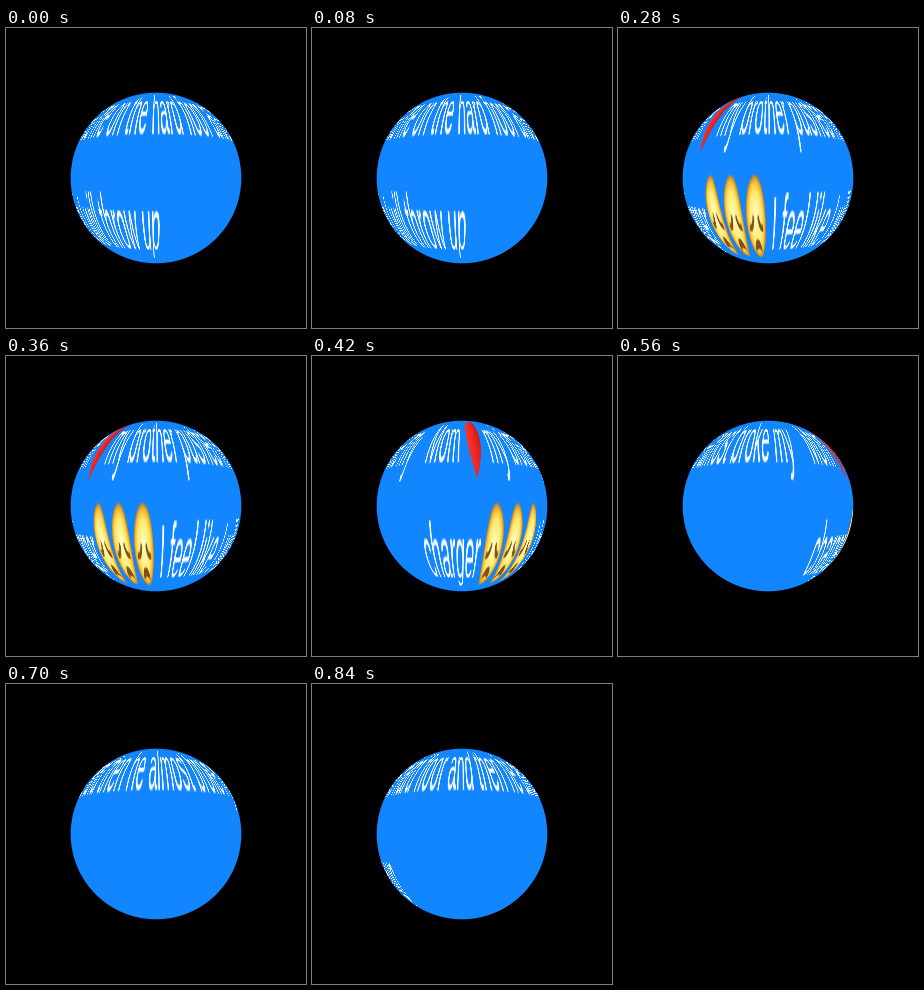
Recreate the animation shown at these times as an HTML page with a canvas. Size 300 px wide and 300 px high, loop 980 ms.

```html
<!DOCTYPE html>
<html lang="en">
<head>
<meta charset="utf-8">
<title>Spinning message ball</title>
<style>
  html, body { margin: 0; width: 100%; height: 100%; overflow: hidden; background: #000; }
  canvas { display: block; width: 300px; height: 300px; }
</style>
</head>
<body>
<canvas id="stage" width="300" height="300"></canvas>
<script>
const SIZE = 300, MID = 150, RADIUS = 85.3;
const CAMERA = 3.7;            // eye distance in ball radii
const STEPS = 7, STEP_MS = 140;
const EM = 40;                 // text size on the flat strip
const STRIP_W = 1436, STRIP_H = 144;
const START = 0.51;            // part of the strip facing the viewer at first
const BLUE = '#1186ff';

const stage = document.getElementById('stage').getContext('2d');

function makeStrip() {
  const canvas = document.createElement('canvas');
  canvas.width = STRIP_W;
  canvas.height = STRIP_H;
  const ctx = canvas.getContext('2d');
  ctx.fillStyle = BLUE;
  ctx.fillRect(0, 0, STRIP_W, STRIP_H);
  ctx.font = `${EM}px "Liberation Sans", Arial, sans-serif`;

  // Lays out strings, gaps and drawn symbols from left to right.
  function line(baseline, parts) {
    let pen = 24;
    for (const part of parts) {
      if (typeof part === 'string') {
        ctx.fillStyle = '#fff';
        ctx.fillText(part, pen, baseline);
        pen += ctx.measureText(part).width;
      } else if (typeof part === 'number') {
        pen += part;
      } else {
        ctx.save();
        ctx.translate(pen + 26, baseline - 15);
        part(ctx);
        ctx.restore();
        pen += 52;
      }
    }
  }

  line(52.5, ['Mom ', heart,
    ' my brother pushed me on the hard floor and then he almost broke my']);
  line(108.2, ['charger', 5, face, face, face, ' I feel like I will throw up']);
  return ctx.getImageData(0, 0, STRIP_W, STRIP_H).data;
}

function heart(ctx) {
  const red = ctx.createLinearGradient(-20, 0, 20, 0);
  red.addColorStop(0, '#f8382e');
  red.addColorStop(0.6, '#e9241f');
  red.addColorStop(1, '#c91a18');
  ctx.fillStyle = red;
  ctx.beginPath();
  ctx.moveTo(0, 23);
  ctx.bezierCurveTo(-11, 15, -21, 6, -21, -6);
  ctx.bezierCurveTo(-21, -21, -5, -22, 0, -11);
  ctx.bezierCurveTo(5, -22, 21, -21, 21, -6);
  ctx.bezierCurveTo(21, 6, 11, 15, 0, 23);
  ctx.fill();
}

function face(ctx) {
  const skin = ctx.createRadialGradient(0, -5, 3, 0, 0, 22.5);
  skin.addColorStop(0, '#fffab4');
  skin.addColorStop(0.55, '#ffe96a');
  skin.addColorStop(0.82, '#f3b935');
  skin.addColorStop(1, '#b97a18');
  ctx.fillStyle = skin;
  ctx.beginPath();
  ctx.arc(0, 0, 22.5, 0, 7);
  ctx.fill();

  ctx.strokeStyle = ctx.fillStyle = '#80501a';
  ctx.lineWidth = 3.5;
  for (const side of [-1, 1]) {
    ctx.beginPath();
    ctx.moveTo(side * 5, -5);
    ctx.quadraticCurveTo(side * 8, 2, side * 16, 1);
    ctx.stroke();
  }
  ctx.beginPath();
  ctx.moveTo(-10, 17);
  ctx.bezierCurveTo(-9, 4, 9, 4, 10, 17);
  ctx.quadraticCurveTo(0, 11, -10, 17);
  ctx.fill();
}

// Casts a ray through every ball pixel; keeps strip coordinates and edge coverage.
function makeBall() {
  const ball = [];
  const far = CAMERA * CAMERA - 1;
  const focus = RADIUS * Math.sqrt(far);
  for (let py = 0; py < SIZE; py++) {
    for (let px = 0; px < SIZE; px++) {
      const dx = px + 0.5 - MID, dy = py + 0.5 - MID;
      const cover = Math.min(1, RADIUS + 0.5 - Math.hypot(dx, dy));
      if (cover <= 0) continue;
      const rx = dx / focus, ry = dy / focus;
      const a = rx * rx + ry * ry + 1;
      const t = (CAMERA - Math.sqrt(Math.max(0, CAMERA * CAMERA - a * far))) / a;
      const x = rx * t, y = ry * t, z = CAMERA - t;
      const lon = Math.atan2(x, z), lat = Math.atan2(y, Math.hypot(x, z));
      ball.push({
        at: (py * SIZE + px) * 4,
        u: lon / (2 * Math.PI) * STRIP_W - 0.5,
        v: (lat / Math.PI + 0.5) * STRIP_H - 0.5,
        cover
      });
    }
  }
  return ball;
}

const strip = makeStrip();
const ball = makeBall();
const picture = stage.createImageData(SIZE, SIZE);
for (let i = 3; i < picture.data.length; i += 4) picture.data[i] = 255;

function draw(turn) {
  const start = (START - turn + 2) * STRIP_W;
  const out = picture.data;
  for (const { at, u, v, cover } of ball) {
    const s = (u + start) % STRIP_W;
    const x0 = Math.floor(s), x1 = (x0 + 1) % STRIP_W, fx = s - x0;
    const y0 = Math.floor(v), fy = v - y0;
    const a = (y0 * STRIP_W + x0) * 4, b = (y0 * STRIP_W + x1) * 4;
    const c = a + STRIP_W * 4, d = b + STRIP_W * 4;
    for (let k = 0; k < 3; k++) {
      const top = strip[a + k] * (1 - fx) + strip[b + k] * fx;
      const low = strip[c + k] * (1 - fx) + strip[d + k] * fx;
      out[at + k] = (top * (1 - fy) + low * fy) * cover;
    }
  }
  stage.putImageData(picture, 0, 0);
}

// The ball turns in seven hard steps per loop.
let shown = -1;
const begin = performance.now();
function tick() {
  const step = Math.floor((performance.now() - begin) / STEP_MS) % STEPS;
  if (step !== shown) draw((shown = step) / STEPS);
  requestAnimationFrame(tick);
}
tick();
</script>
</body>
</html>
```
